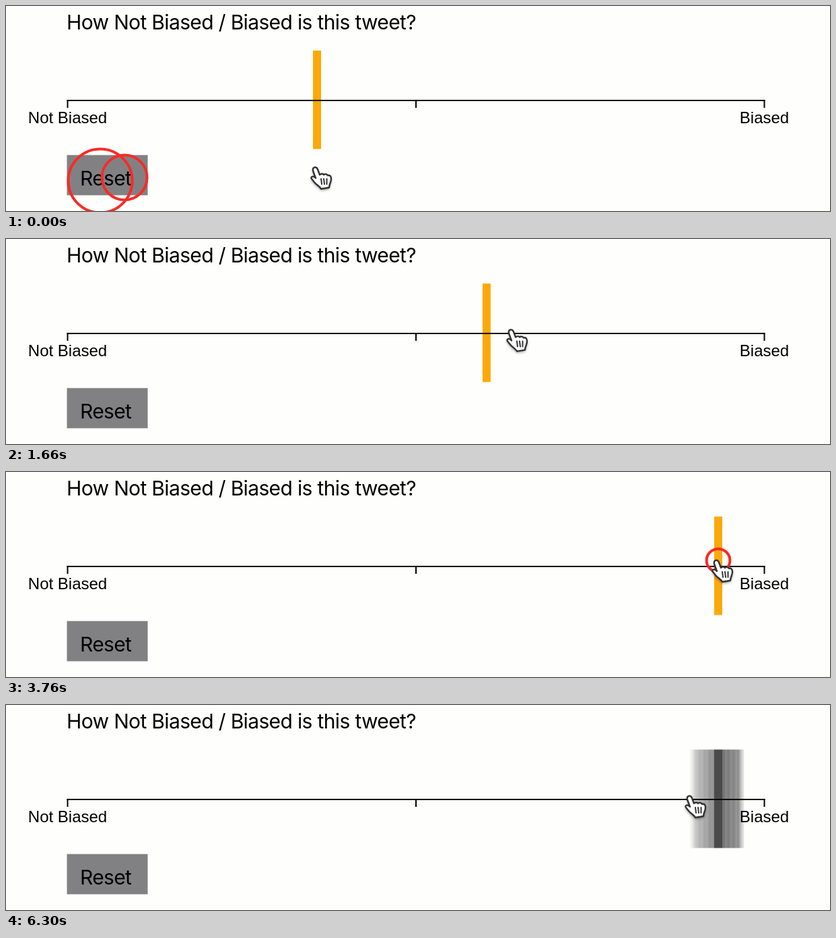
An HTML page with a canvas that plays this animation: 1224 px wide and 306 px high, repeating every 6.36 s.

```html
<!DOCTYPE html>
<html lang="en">
<head>
<meta charset="utf-8">
<title>Bias slider</title>
<style>
  html, body { margin: 0; width: 100%; height: 100%; overflow: hidden; background: #fefefc; }
  canvas { display: block; }
</style>
</head>
<body>
<canvas id="stage" width="1224" height="306"></canvas>
<script>
const ctx = document.getElementById('stage').getContext('2d');
const LOOP = 6360;
const BAR_LAG = 40;
const PLACED_AT = 3800;   // first click fixes the bar and starts the spread
const LOCKED_AT = 5200;   // second click fixes the spread
const PLACED_X = 1058;
const BAR_TOP = 66.5, BAR_HEIGHT = 147;
const RING_LIFE = 1270;

const pointerStart = { x: 462, y: 241 };
const pointerMoves = [
  { from: 0, to: 660, x: 974, y: 137 },
  { from: 700, to: 1270, x: 550, y: 136 },
  { from: 1350, to: 2340, x: 1041, y: 135 },
  { from: 2430, to: 2500, x: 1035, y: 135 },
  { from: 2650, to: 3000, x: 1073, y: 132 },
  { from: 3250, to: 3430, x: PLACED_X, y: 132 },
  { from: 3830, to: 4020, x: 1079, y: 133 },
  { from: 4020, to: 4420, x: 1018, y: 136 }
];

const clicks = [
  { start: -1088, x: 140, y: 261 },
  { start: -570, x: 176, y: 256 },
  { start: 3630, x: PLACED_X, y: 132 },
  { start: 5030, x: 1018, y: 136 }
];

// Quick start, long settling end.
function ease(u) {
  const smooth = u * u * (3 - 2 * u);
  return 1 - (1 - smooth) ** 2;
}

function pointerAt(t) {
  let { x, y } = pointerStart;
  for (const move of pointerMoves) {
    if (t <= move.from) break;
    const k = ease(Math.min(1, (t - move.from) / (move.to - move.from)));
    x += (move.x - x) * k;
    y += (move.y - y) * k;
  }
  return { x, y };
}

function rect(x, y, w, h, color) {
  ctx.fillStyle = color;
  ctx.fillRect(x, y, w, h);
}

function text(string, x, y, font, align = 'left', spacing = '0px') {
  ctx.font = font;
  ctx.letterSpacing = spacing;
  ctx.textAlign = align;
  ctx.fillStyle = '#000';
  ctx.fillText(string, x, y);
}

function drawScene() {
  const font = '30px Inter, sans-serif', spacing = '-0.65px';
  rect(0, 0, 1224, 306, '#fefefc');
  text('How Not Biased / Biased is this tweet?', 90, 35, font, 'left', spacing);
  rect(90.5, 222.5, 120, 60, '#818183');
  text('Reset', 110, 268, font, 'left', spacing);
}

function drawAxis() {
  rect(90.5, 140, 1037, 2, '#000');
  for (const x of [90.5, 608, 1125.5]) rect(x, 140, 2, 12, '#000');
  const font = '24px "Liberation Sans", Arial, sans-serif';
  text('Not Biased', 91.5, 175, font, 'center');
  text('Biased', 1126.5, 175, font, 'center');
}

// Striped haze on both sides of the placed bar, fading outwards.
function drawSpread(reach, rgb) {
  for (const side of [-1, 1]) {
    const width = reach * (side < 0 ? 1.05 : 0.97);
    for (let d = 6; d < width; d += 2) {
      const u = d / width;
      const edge = Math.min(1, (1 - u) / 0.25);
      const base = side < 0 ? 0.7 - 0.47 * u : 0.8 - 0.25 * u;
      const stripe = 0.96 + 0.06 * Math.sin(d * 2.3 + side);
      const w = Math.min(2, width - d);
      const x = side < 0 ? PLACED_X - d - w : PLACED_X + d;
      rect(x, BAR_TOP, w, BAR_HEIGHT, `rgba(${rgb},${base * stripe * edge})`);
    }
  }
}

function drawBar(t) {
  let { x } = pointerAt(t - BAR_LAG), color = '#fba90a';
  if (t >= PLACED_AT) {
    const reach = Math.abs(pointerAt(t).x - PLACED_X);
    drawSpread(reach, t < LOCKED_AT ? '248,183,35' : '74,74,76');
    x = PLACED_X;
    color = '#4a4a4b';
  }
  rect(x - 6, BAR_TOP, 12, BAR_HEIGHT, color);
}

function drawRings(t) {
  ctx.strokeStyle = '#f92a26';
  ctx.lineWidth = 4;
  for (const { start, x, y } of clicks) {
    const s = (t - start) / RING_LIFE;
    if (s < 0 || s >= 1) continue;
    ctx.beginPath();
    ctx.arc(x, y, 12 + 38 * (1 - (1 - s) ** 1.4), 0, 2 * Math.PI);
    ctx.stroke();
  }
}

const hand = new Path2D(
  'M-6 5 C-7 -1 -1 -2 1 3 L4 11 C6 9 9 9 10 11 C12 9 15 10 16 12 ' +
  'C19 11 21 13 21 17 C21 22 18 25 18 30 L6 32 C4 28 -1 26 -4 22 ' +
  'L-8 17 C-10 14 -6 12 -3 15 L-2 16 Z');
const fingerLines = new Path2D('M6 17 L7 25 M10 17 L11 25 M14.5 17 L14.5 25');

function drawHand(t) {
  const { x, y } = pointerAt(t);
  ctx.save();
  ctx.translate(x, y);
  ctx.lineJoin = ctx.lineCap = 'round';
  ctx.shadowColor = 'rgba(0,0,0,.5)';
  ctx.shadowBlur = 4;
  ctx.shadowOffsetY = 2;
  ctx.fillStyle = '#fff';
  ctx.fill(hand);
  ctx.shadowColor = 'transparent';
  ctx.strokeStyle = '#333';
  ctx.lineWidth = 2.4;
  ctx.stroke(hand);
  ctx.lineWidth = 2;
  ctx.stroke(fingerLines);
  ctx.restore();
}

function render(now) {
  const t = now % LOOP;
  drawScene();
  drawBar(t);
  drawAxis();
  drawRings(t);
  drawHand(t);
  requestAnimationFrame(render);
}
requestAnimationFrame(render);
</script>
</body>
</html>
```
